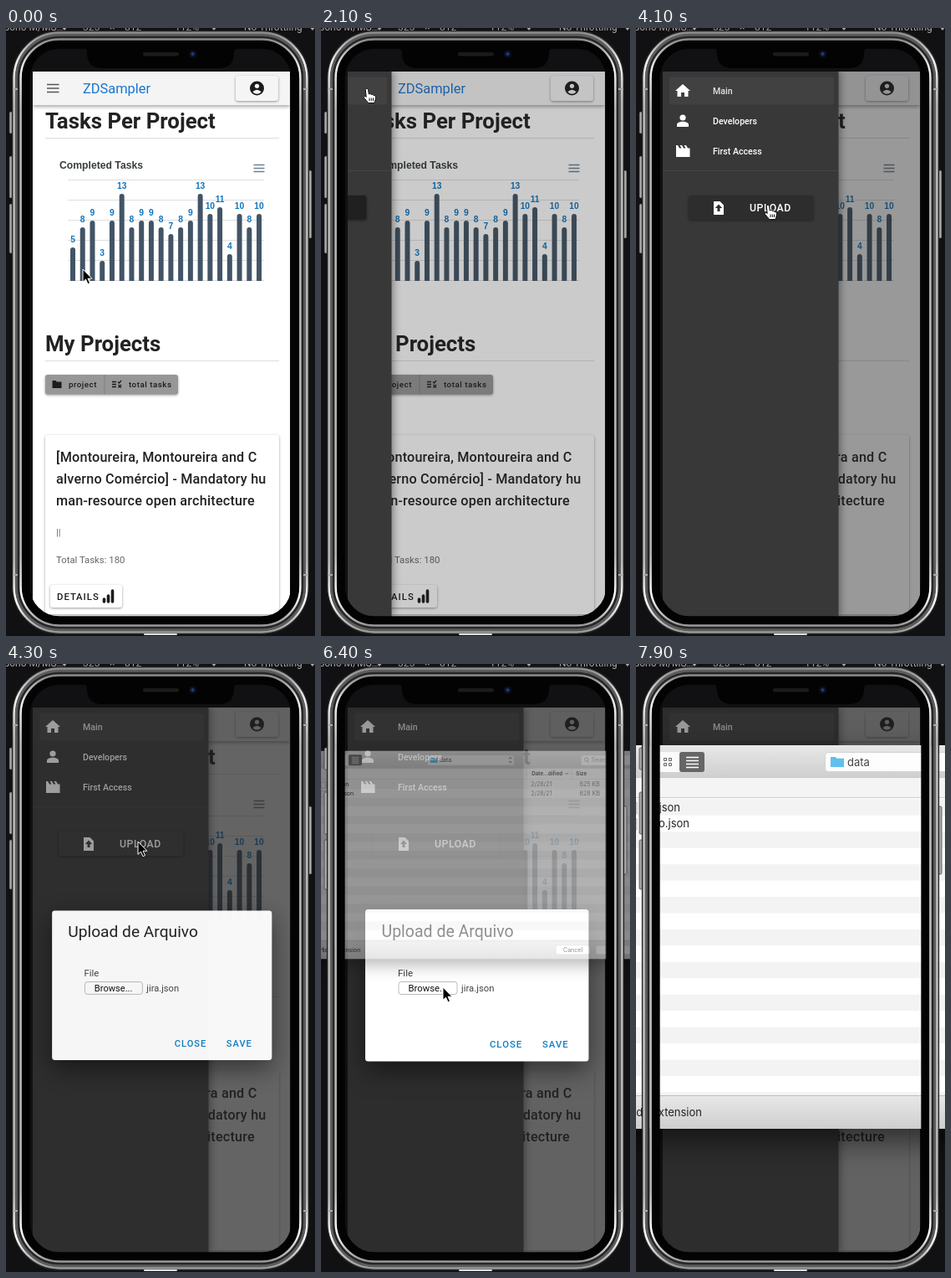
Animation, 370 px wide and 726 px high, one loop 8000 ms. Source, as an HTML page:

```html
<!DOCTYPE html>
<html lang="en">
<head>
<meta charset="utf-8">
<title>Task dashboard</title>
<style>
  html, body { margin: 0; width: 100%; height: 100%; overflow: hidden; background: #111113; }
  svg { display: block; width: 370px; height: 726px; font-family: Roboto, sans-serif; }
  .m { font-weight: 500; }
  .h { font-weight: 700; font-size: 25.8px; fill: #222; }
  .card-title { font-weight: 500; font-size: 16.2px; letter-spacing: .2px; fill: #222; }
  .btn { font-weight: 500; font-size: 11.3px; letter-spacing: 1px; }
  .chip { font-weight: 500; font-size: 9.8px; letter-spacing: .5px; fill: #1c1c1c; }
  .nav { font-weight: 500; font-size: 10.6px; fill: #fff; }
  .chart { font-family: "Liberation Sans", Arial, sans-serif; font-weight: 700; }
  .mac { font-family: Inter, sans-serif; font-size: 13px; }
  .soft { filter: drop-shadow(0 1px 1.5px rgba(0,0,0,.4)); }
  .deep { filter: drop-shadow(0 10px 15px rgba(0,0,0,.5)); }
  .sheet { filter: drop-shadow(0 14px 18px rgba(0,0,0,.55)); }
</style>
</head>
<body>
<svg id="stage" viewBox="0 0 370 726">
  <defs>
    <clipPath id="view"><rect x="32" y="52" width="308" height="651"/></clipPath>
    <linearGradient id="bar" x2="0" y2="1"><stop stop-color="#e9e8e9"/><stop offset="1" stop-color="#cfcecf"/></linearGradient>
    <linearGradient id="steel" x2="0" y2="1">
      <stop stop-color="#8c8c8c"/><stop offset=".05" stop-color="#f2f2f2"/><stop offset=".12" stop-color="#bcbcbc"/>
      <stop offset=".88" stop-color="#bcbcbc"/><stop offset=".95" stop-color="#fff"/><stop offset="1" stop-color="#999"/>
    </linearGradient>
  </defs>

  <rect width="370" height="726" fill="#111113"/>
  <g font-size="12" fill="#a9a9ab">
    <text x="-2" y="3">sono M/MS…</text><path d="M66 -2h8l-4 5z"/>
    <text x="92" y="3">325</text><text x="124" y="3">×</text><text x="142" y="3">812</text>
    <text x="202" y="3">112%</text><path d="M245 -2h8l-4 5z"/>
    <text x="285" y="3">No Throttling</text><path d="M363 -2h8l-4 5z"/>
  </g>

  <g clip-path="url(#view)">
    <rect x="32" y="52" width="308" height="651" fill="#fff"/>
    <text class="h" x="47" y="120">Tasks Per Project</text>
    <path d="M47 131.5H327M47 397.5H327" stroke="#ddd"/>
    <text class="chart" x="64" y="167.5" font-size="12.2" fill="#373d3f">Completed Tasks</text>
    <path d="M296.500 163.500h13m-13 4h13m-13 4h13" stroke="#6e8192" stroke-width="1.400"/>
    <g id="chart" class="chart" font-size="10.3" fill="#0f74bd" text-anchor="middle"></g>
    <text class="h" x="47" y="386">My Projects</text>
    <g class="soft"><rect x="47" y="414" width="159" height="23.500" rx="3" fill="#979797"/></g>
    <path d="M118 414v23.500" stroke="#808080"/>
    <path d="M55.500 421h4l1.300 1.500h5.700v7.500h-11z" fill="#1c1c1c"/>
    <text class="chip" x="75" y="429">project</text>
    <path d="M127 422.500h5m-5 3h5m-5 3h5m2.500 1 3.500-3.500m-3.500 0 3.500 3.500m-4-7 1.500 1.500 2.500-3" fill="none" stroke="#1c1c1c" stroke-width="1.300"/>
    <text class="chip" x="147" y="429">total tasks</text>
    <rect class="soft" x="47" y="486" width="280" height="214" rx="3" fill="#fff"/>
    <g class="card-title">
      <text x="60" y="518">[Montoureira, Montoureira and C</text>
      <text x="60" y="544">alverno Comércio] - Mandatory hu</text>
      <text x="60" y="570">man-resource open architecture</text>
    </g>
    <g font-size="11.35" fill="#666"><text x="60" y="606">||</text><text x="60" y="639">Total Tasks: 180</text></g>
    <rect class="soft" x="53" y="665" width="86" height="27" rx="3" fill="#fff"/>
    <text class="btn" x="61" y="683" fill="#1c1c1c">DETAILS</text>
    <path d="M117.500 685v-3m5 3v-7m5 7v-13" stroke="#1c1c1c" stroke-width="3.600" stroke-linecap="round"/>

    <rect x="32" y="52" width="308" height="40" fill="#f4f4f4" style="filter:drop-shadow(0 2px 2px rgba(0,0,0,.35))"/>
    <circle id="hover" cx="56" cy="72" r="19"/>
    <path d="M49 67.500h14.500m-14.500 4.500h14.500m-14.500 4.500h14.500" stroke="#555" stroke-width="1.600"/>
    <text x="92" y="78" font-size="16.4" fill="#1976d2">ZDSampler</text>
    <rect class="soft" x="275" y="57" width="51" height="30" rx="3" fill="#f5f5f5"/>
    <circle cx="300.500" cy="72" r="8.500" fill="#1c1c1c"/>
    <circle cx="300.500" cy="69.300" r="2.600" fill="#f5f5f5"/>
    <path d="M295.300 76.200q5.200-5 10.400 0-5.200 5-10.400 0z" fill="#f5f5f5"/>

    <rect id="dim" x="32" y="52" width="308" height="651" fill="#212121"/>
    <g id="drawer">
      <rect x="32" y="52" width="210.500" height="651" fill="#383838" style="filter:drop-shadow(2px 0 5px rgba(0,0,0,.4))"/>
      <rect x="40" y="58.500" width="197" height="33" rx="3" fill="#fff" opacity=".045"/>
      <g fill="#fff">
        <path d="M56 67l9 8h-2.500v7h-4.500v-5h-4v5h-4.500v-7h-2.500z"/>
        <circle cx="56" cy="107" r="3.600"/><path d="M49 118v-2.500c0-5 14-5 14 0v2.500z"/>
        <path d="M48 140h2l2 3.500h2.500l-2-3.500h2.500l2 3.500h2.500l-2-3.500h2.500l2 3.500h2.500v10.500h-16.500z"/>
      </g>
      <text class="nav" x="92" y="78.500" fill-opacity=".85">Main</text>
      <text class="nav" x="92" y="114.500">Developers</text>
      <text class="nav" x="92" y="150.500">First Access</text>
      <path d="M32 170.500H242" stroke="#444"/>
      <rect class="soft" x="63" y="200" width="149.500" height="29" rx="3" fill="#202020"/>
      <rect id="focus" x="63" y="200" width="149.500" height="29" rx="3" fill="#fff"/>
      <path d="M93 207h7.500l4.500 4.500v11.500h-12zM99 210.500l-4.200 4.500h2.700v4h3v-4h2.700z" fill="#fff" fill-rule="evenodd"/>
      <text class="m" x="136" y="219.200" font-size="12.300" letter-spacing=".5" fill="#fff">UPLOAD</text>
    </g>
    <rect id="dim2" x="32" y="52" width="308" height="651" fill="#212121"/>
    <g id="dialog">
      <rect class="deep" x="53" y="293" width="267.500" height="181.500" rx="3.500" fill="#fff"/>
      <text x="72.500" y="325.500" font-size="19.500" fill="#222">Upload de Arquivo</text>
      <text x="92" y="373" font-size="11.500" fill="#444">File</text>
      <rect x="93" y="379.500" width="70" height="15" rx="3" fill="#fff" stroke="#bbb"/>
      <text x="104.500" y="390.700" font-size="11.300" fill="#111">Browse...</text>
      <text x="168" y="390.700" font-size="11.300" fill="#444">jira.json</text>
      <g class="btn" fill="#0f7fc4"><text x="202" y="457.700">CLOSE</text><text x="265" y="457.700">SAVE</text></g>
    </g>
  </g>

  <g id="files" class="mac">
    <rect class="sheet" x="-192" y="-1" width="740" height="458" fill="#fff"/>
    <g id="rows" fill="#f3f3f3"></g>
    <rect x="-192" y="-1" width="740" height="38.500" fill="url(#bar)"/>
    <rect x="-192" y="37.500" width="740" height="24" fill="#f4f4f4"/>
    <path d="M-192 37.500H548M-192 61.500H548M303.500 41v18M403.500 41v18" stroke="#cbcbcb"/>
    <rect x="-120" y="7" width="32" height="24" rx="3" fill="#fafafa"/>
    <rect x="-90" y="7" width="30" height="24" rx="3" fill="#666"/>
    <path d="M-82 13.500h15m-15 4h15m-15 4h15m-15 4h15" stroke="#fff" stroke-width="1.300"/>
    <path d="M-108.500 14.500h3v3h-3zm6 0h3v3h-3zm-6 6h3v3h-3zm6 0h3v3h-3z" fill="none" stroke="#666"/>
    <rect x="84.500" y="7.500" width="192" height="23" rx="4" fill="#fdfdfd" stroke="#d2d2d2"/>
    <path d="M91 13h6l1.500 1.800h8.500v10.200h-16z" fill="#5fc0ee"/>
    <text x="111" y="23.500" fill="#444">data</text>
    <path d="M265 16.500l3-3.500 3 3.500m-6 5 3 3.500 3-3.500" fill="none" stroke="#555" stroke-width="1.500"/>
    <rect x="424" y="7.500" width="110" height="23" rx="4" fill="#fdfdfd" stroke="#d2d2d2"/>
    <circle cx="436" cy="18" r="4" fill="none" stroke="#777"/><path d="M439 21l3 3.500" stroke="#777"/>
    <text x="447" y="23.500" fill="#aaa">Search</text>
    <g font-size="11.500" font-weight="600" fill="#333"><text x="315" y="53">Date...dified</text><text x="413" y="53">Size</text></g>
    <path d="M389 47l3.500 3.500 3.500-3.500" fill="none" stroke="#555" stroke-width="1.400"/>
    <g text-anchor="end" fill="#222"><text x="-89" y="77.500">jira.json</text><text x="-78" y="97">hello.json</text></g>
    <path d="M-150 67.500h9v13h-9zm0 19.500h9v13h-9z" fill="#fff" stroke="#aaa"/>
    <g fill="#777"><text x="313" y="77.500">2/28/21</text><text x="313" y="97">2/28/21</text><text x="421" y="77.500">625 KB</text><text x="421" y="97">628 KB</text></g>
    <rect x="-192" y="417.500" width="740" height="39.500" fill="url(#bar)"/>
    <path d="M-192 417.500H548" stroke="#bdbdbd"/>
    <text x="-63" y="442" text-anchor="end" fill="#222">Hide extension</text>
    <g fill="#fff" stroke="#c4c4c4"><rect x="368.500" y="427" width="76" height="20" rx="4"/><rect x="456.500" y="427" width="76" height="20" rx="4"/></g>
    <g text-anchor="middle" fill="#222"><text x="406" y="442">Cancel</text><text x="494" y="442" fill="#aaa">Open</text></g>
  </g>

  <g id="phone"></g>

  <g id="arrow" stroke="#fff" stroke-width="1" stroke-linejoin="round">
    <path d="M0 0V15.300L3.500 12.100 6 17.700 8.500 16.600 6 11.200H10.900Z" fill="#000"/>
  </g>
  <g id="hand" stroke="#111" stroke-width="1" stroke-linejoin="round">
    <path d="M-1.700 1C-1.700-1 1.400-1 1.600 1L2.300 6C3.500 5 5 5.400 5.200 6.600 6.400 5.800 7.800 6.400 8 7.600 9.200 7.200 10.400 8 10.400 9.500 10.600 12 9.600 14 9 16.500H1.500C.5 14.500-2 12.500-3.500 10.300-4.300 8.700-2.500 7.700-.800 9.500Z" fill="#fff"/>
    <path d="M3 10.500v3.500m2.300-3.500v3.500m2.200-3.500v3.500" fill="none"/>
  </g>
</svg>
<script>
const LOOP = 8000, STEP = 100;
const $ = id => document.getElementById(id);
const set = (id, name, value) => $(id).setAttribute(name, value);
const show = (id, on) => set(id, 'visibility', on ? 'visible' : 'hidden');

function buildChart() {
  const tasks = [5, 8, 9, 3, 9, 13, 8, 9, 9, 8, 7, 8, 9, 13, 10, 11, 4, 10, 8, 10];
  let out = '';
  for (let y = 181.5; y < 303; y += 24) out += `<path d="M74 ${y}H309" stroke="#dedede"/>`;
  tasks.forEach((n, i) => {
    const x = 80 + i * 11.74, top = 302 - n * 8;
    out += `<path d="M${x - 3} 302V${top + 3}a3 3 0 0 1 6 0V302z" fill="#425466"/>
      <text x="${x}" y="${top - 6}">${n}</text>`;
  });
  $('chart').innerHTML = out;
}

function buildRows() {
  let out = '';
  for (let y = 63.3; y < 417; y += 38.9) out += `<rect x="-192" y="${y}" width="740" height="19.45"/>`;
  $('rows').innerHTML = out;
}

function buildPhone() {
  const side = (x, y, h) => `<rect x="${x}" y="${y}" width="4" height="${h}" rx="1.5" fill="#aaa" stroke="#333" stroke-width=".7"/>`;
  const ring = (from, to, color) => {
    const mid = (from + to) / 2;
    return `<rect x="${7 + mid}" y="${3 + mid}" width="${356 - 2 * mid}" height="${721 - 2 * mid}" rx="${57 - mid}"
      fill="none" stroke="${color}" stroke-width="${to - from + .3}"/>`;
  };
  const seam = (x, y) => `<rect x="${x}" y="${y}" width="6" height="2" fill="#aaa"/>`;
  $('phone').innerHTML =
    side(4, 100, 26) + side(4, 153, 50) + side(4, 210, 59) + side(362, 170, 81) +
    ring(0, 1.5, '#222') + ring(1.5, 4, 'url(#steel)') + ring(4, 7, '#5c5c5c') +
    ring(7, 9.5, '#262626') + ring(9.5, 12, 'url(#steel)') + ring(12, 21.5, '#030303') +
    seam(8, 72) + seam(8, 652) + seam(356, 72) + seam(356, 652) +
    `<path d="M92 24H278Q273 24 273 30 273 48 254 48H116Q97 48 97 30 97 24 92 24Z" fill="#030303"/>
     <rect x="164" y="29" width="43" height="4.500" rx="2.200" fill="#1b1b1d"/>
     <circle cx="223.500" cy="31" r="4.500" fill="#0b1020"/><circle cx="223.500" cy="31" r="2" fill="#1d3c7c"/>
     <rect x="165" y="723" width="40" height="2" rx="1" fill="#ddd"/>`;
}

// Linear track: each key is [time, ...values].
function track(t, keys) {
  if (t <= keys[0][0]) return keys[0].slice(1);
  for (let i = 1; i < keys.length; i++) {
    const a = keys[i - 1], b = keys[i];
    if (t <= b[0]) {
      const k = (t - a[0]) / (b[0] - a[0]);
      return a.slice(1).map((v, j) => v + (b[j + 1] - v) * k);
    }
  }
  return keys[keys.length - 1].slice(1);
}

const pointer = [
  [700, 92, 288], [900, 88, 262], [1200, 68, 145], [1400, 56, 85], [1600, 55, 73],
  [2700, 55, 73], [2900, 92, 118], [3100, 146, 180], [3300, 156, 205], [3500, 158, 212],
  [4900, 158, 212], [5100, 162, 240], [5400, 158, 330], [5600, 149, 375], [5800, 146, 386],
  [6400, 146, 386], [6600, 210, 400], [6900, 345, 430],
  [7000, 345, 430], [7100, 302, 82], [7300, 284, 40], [7500, 278, 24], [7600, 278, 24]
];
const drag = [[7600, 0, 0], [7700, 45, 60], [7800, 120, 130], [7900, 142, 98]];

function draw(t) {
  const [dx, dy] = track(t, drag);
  const [x, y] = track(t, pointer);
  const hand = (t >= 1500 && t < 2800) || (t >= 3400 && t < 4200);
  show('arrow', !hand);
  show('hand', hand);
  set(hand ? 'hand' : 'arrow', 'transform', `translate(${x + dx} ${y + dy})`);

  set('hover', 'opacity', track(t, [[1400, 0], [1600, .07], [1700, .2], [2000, .07]])[0]);

  const [slide] = track(t, [[2000, -212], [2100, -158], [2200, -18], [2300, 0]]);
  show('drawer', t > 2000);
  set('drawer', 'transform', `translate(${slide} 0)`);
  set('dim', 'opacity', track(t, [[2000, 0], [2100, .23], [2200, .42], [2300, .46]])[0]);

  set('focus', 'opacity', track(t, [[3300, 0], [3500, .06], [4100, .06], [4200, .12]])[0]);
  set('dim2', 'opacity', track(t, [[4100, 0], [4200, .3], [4300, .44], [4400, .46]])[0]);
  const [grow, solid] = track(t, [[4100, .5, 0], [4200, .85, .6], [4300, .984, .96], [4400, 1, 1]]);
  show('dialog', t > 4100);
  set('dialog', 'opacity', solid);
  set('dialog', 'transform', `translate(186.7 383.7) scale(${grow}) translate(-186.7 -383.7)`);

  const [zoom, fade] = track(t, [[6400, .542, .5], [6500, .9, .93], [6600, 1, 1]]);
  show('files', t >= 6400);
  set('files', 'opacity', fade);
  set('files', 'transform', `translate(${178 + dx} ${228 + dy}) scale(${zoom}) translate(-178 -228)`);
}

buildChart();
buildRows();
buildPhone();
const start = performance.now();
function tick() {
  const t = (performance.now() - start) % LOOP;
  draw(Math.floor(t / STEP) * STEP);
  requestAnimationFrame(tick);
}
tick();
</script>
</body>
</html>
```
